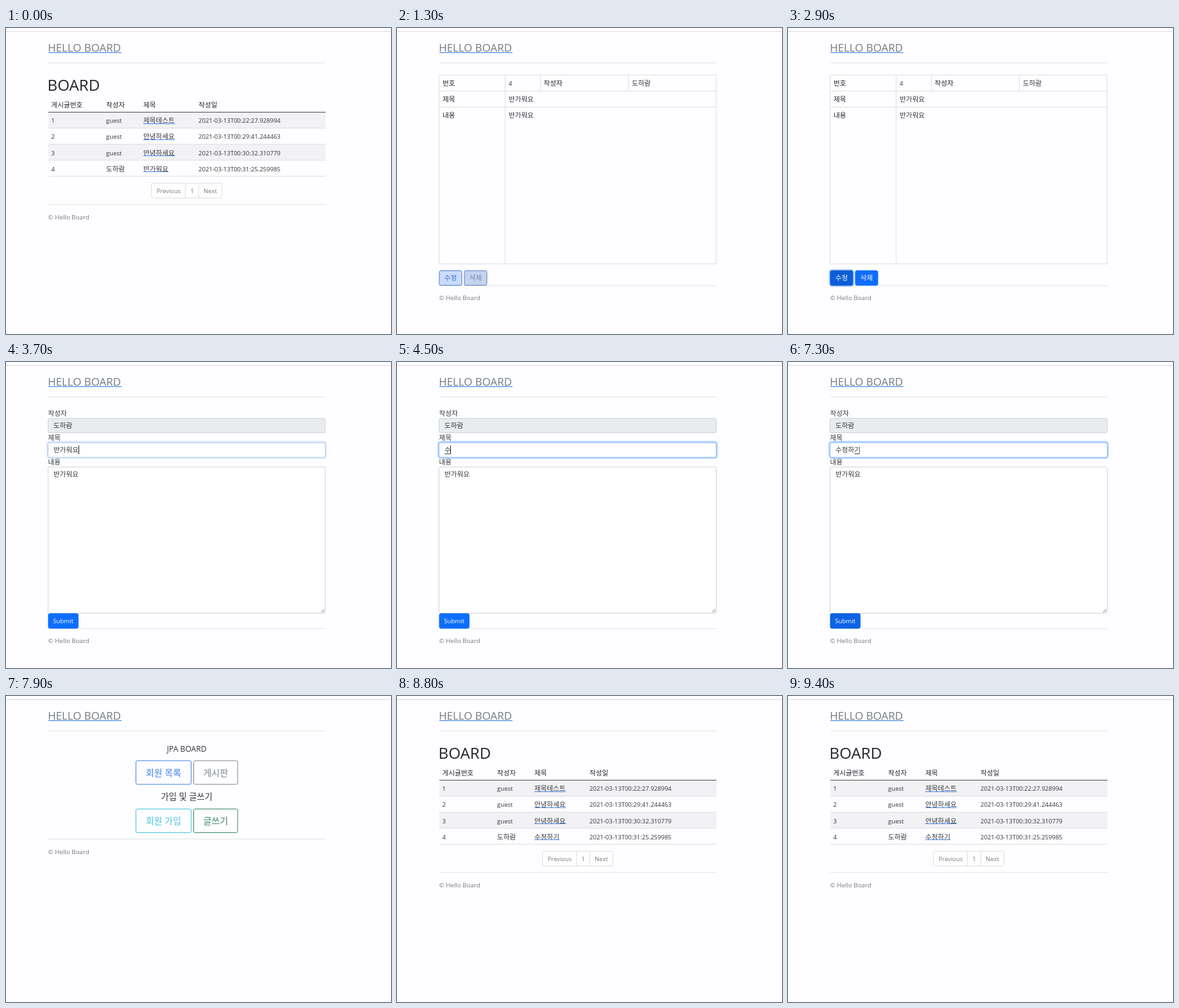
Recreate the animation shown at these times as an HTML page. Size 600x478 px, loop 9600 ms.

```html
<!DOCTYPE html>
<html lang="ko">
<head>
<meta charset="utf-8">
<title>Hello Board</title>
<style>
html, body { margin: 0; width: 100%; height: 100%; overflow: hidden; background: #fefdff; }
svg { display: block; width: 600px; height: 478px; font-family: "Open Sans", "Noto Sans CJK KR", sans-serif; }
</style>
</head>
<body>
<svg id="stage" viewBox="0 0 600 478"></svg>
<script>
const LOOP = 9600, TICK = 100;
const INK = '#32373c', GREY = '#747b82', RULE = '#e4e5e9', EDGE = '#dee0e5', BLUE = '#0d6efd';
const KO = 10.6, EN = 9.6, CHAR = 9.8;
const AUTHOR = '도하람', OLD_TITLE = '반가워요', NEW_TITLE = '수정하기';
const stage = document.getElementById('stage');

const clamp = v => Math.max(0, Math.min(1, v));
const ramp = (t, start, length) => clamp((t - start) / length);
const rgb = hex => [1, 3, 5].map(i => parseInt(hex.slice(i, i + 2), 16));
const mix = (a, b, p) => {
  const to = rgb(b);
  return `rgb(${rgb(a).map((v, i) => Math.round(v + (to[i] - v) * p))})`;
};

const text = (x, y, s, size = KO, fill = INK, extra = '') =>
  `<text x="${x}" y="${y}" font-size="${size}" fill="${fill}" ${extra}>${s}</text>`;
const bold = (x, y, s) => text(x, y, s, KO, '#212529', 'font-weight="500"');
const centered = (x, y, s, size, fill) => text(x, y, s, size, fill, 'text-anchor="middle"');
const path = (d, stroke = EDGE, width = 1) =>
  `<path d="${d}" fill="none" stroke="${stroke}" stroke-width="${width}"/>`;
const box = (x, y, w, h, fill, stroke, r = 2.5, extra = '') =>
  `<rect x="${x}" y="${y}" width="${w}" height="${h}" rx="${r}" fill="${fill}" stroke="${stroke}" ${extra}/>`;
const rule = y => path(`M66 ${y}H498`, RULE);
const ring = (x, y, w, h, opacity) =>
  box(x, y, w, h, 'none', '#86b7fe', 3.5, `stroke-width="3" stroke-opacity="${opacity}"`);
const footer = (ruleY, y) => rule(ruleY) + text(65.5, y, '© Hello Board', 9.8, GREY);

function header() {
  return path('M0 5.5H600', '#dcdde1') +
    text(65.2, 37, 'HELLO BOARD', 16.9, GREY) +
    path('M66 38.5H180', '#2f7bea', 1.2) + rule(54.5);
}

function listPage(lastTitle) {
  const rows = [
    ['guest', '제목테스트', '22:27.928994'],
    ['guest', '안녕하세요', '29:41.244463'],
    ['guest', '안녕하세요', '30:32.310779'],
    [AUTHOR, lastTitle, '31:25.259985']
  ];
  let out = text(64.5, 98, 'BOARD', 24.2, '#212529');
  [[70.5, '게시글번호'], [156, '작성자'], [214, '제목'], [300, '작성일']]
    .forEach(([x, s]) => out += bold(x, 123.5, s));
  rows.forEach(([author, title, time], i) => {
    const top = 132 + i * 25.1, y = top + 16.3;
    if (i % 2 === 0) out += `<rect x="66" y="${Math.floor(top)}" width="432" height="25" fill="#f2f1f3"/>`;
    out += path(`M66 ${Math.floor(top + 25) - .5}H498`) +
      text(70.5, y, i + 1, EN) +
      text(156, y, author, author === AUTHOR ? KO : EN) +
      text(214, y, title) +
      path(`M214 ${Math.floor(y) + 1.5}h${title.length * CHAR}`, '#3f82e6') +
      text(300, y, '2021-03-13T00:' + time, 9.53);
  });
  return out + path('M66 131.5H498', '#4a4e53') +
    box(226.5, 242.5, 110, 23, '#fff', EDGE) + path('M279.5 243V266M300.5 243V266') +
    centered(253.5, 258, 'Previous', 9.4, GREY) + centered(290, 258, '1', EN, GREY) +
    centered(318.5, 258, 'Next', EN, GREY) + footer(275.5, 299);
}

function detailPage(t) {
  const load = ramp(t, 1300, 200), hover = ramp(t, 2300, 200);
  const button = (x, s, fill, stroke, ink) =>
    box(x, 379, 35, 23, fill, stroke) + centered(x + 17.5, 394.3, s, KO, ink);
  const edit = load < 1 ? mix('#c9dcfc', BLUE, load) : mix(BLUE, '#0b5ed7', hover);
  return path('M66 73.5H497.5V368.5H65.5V73.5M66 98.5H498M66 123.5H498M168.5 73V369M223.5 73V98M360.5 73V98') +
    bold(71, 89.5, '번호') + text(174, 89.5, '4', EN) + bold(228.5, 89.5, '작성자') + text(366, 89.5, AUTHOR) +
    bold(71, 114.5, '제목') + text(174, 114.5, OLD_TITLE) +
    bold(71, 139.7, '내용') + text(174, 139.7, OLD_TITLE) +
    footer(402.5, 425.3) +
    (t >= 2700 ? ring(65, 378, 37, 25, .55) : '') +
    button(66, '수정', edit, load < 1 ? mix('#4a78c8', BLUE, load) : mix(BLUE, '#0a58ca', hover), mix('#3d6fd0', '#ffffff', load)) +
    button(105, '삭제', mix('#c5d3ee', BLUE, load), mix('#5d80c4', BLUE, load), mix('#7387b4', '#ffffff', load));
}

function titleAt(t) {
  if (t < 4400) return OLD_TITLE;
  const steps = [[5600, NEW_TITLE], [5500, '수정하'], [5400, '수정ㅎ'], [4900, '수정'], [4800, '수ㅈ'], [4500, '수']];
  const step = steps.find(([start]) => t >= start);
  return step ? step[1] : '';
}

function caretVisible(t) {
  if (t < 3600 || t >= 7600) return false;
  if (t < 4400) return t < 4000;
  return t < 5600 || Math.floor((t - 5600) / 540) % 2 === 0;
}

function editPage(t) {
  const focus = ramp(t, 3550, 300) * (1 - ramp(t, 7500, 200));
  const load = ramp(t, 2950, 150), hover = ramp(t, 7100, 300);
  const title = titleAt(t), end = 74 + title.length * CHAR;
  const fill = load < 1 ? mix('#c9dcfc', BLUE, load) : mix(BLUE, '#0b5ed7', hover);
  let out = text(65.5, 84, '작성자') + text(65.5, 122, '제목') + text(65.5, 160, '내용') +
    box(65.5, 88, 432, 22.5, '#e9ecef', '#ced4da') + text(74, 103, AUTHOR) +
    (focus ? ring(64.5, 124.8, 434, 25, focus * .55) : '') +
    box(65.5, 126, 432, 23, '#fff', mix('#ced4da', '#86b7fe', focus)) + text(74, 141, title) +
    box(65.5, 164, 432, 228.5, '#fff', '#ced4da') + text(74, 179, OLD_TITLE) +
    path('M491 391L496 386M494 391L496 389', '#777') + footer(416.5, 439.3);
  if (t >= 4500 && t < 7400) out += path(`M${end - CHAR} 143.5H${end - 1}`, '#444');
  if (caretVisible(t)) out += path(`M${Math.floor(end) + .5 - (title ? 0 : 1)} 130.5V144`, '#222');
  return out + (t >= 7500 ? ring(65, 392, 49, 25, .55) : '') +
    box(66, 393, 46.5, 23, fill, fill) + centered(89.2, 408, 'Submit', 9.6, mix('#3d6fd0', '#ffffff', load));
}

function homePage(t) {
  const load = ramp(t, 7800, 200), hover = ramp(t, 8250, 200);
  const button = (x, y, w, s, from, color, p = 0) => {
    const ink = mix(from, color, load);
    return box(x, y, w, 37, mix('#fefdff', color, p), ink) +
      centered(x + w / 2, y + 23.6, s, 14, p ? mix(color, '#ffffff', p) : ink);
  };
  return centered(281.7, 87, 'JPA BOARD', 12.1, INK) + centered(281.7, 162, '가입 및 글쓰기', 13.3, INK) +
    button(202.5, 101, 86, '회원 목록', '#6d96d8', BLUE) +
    button(292.5, 101, 68.5, '게시판', '#92969c', '#6c757d', hover) +
    button(202.5, 176.5, 86, '회원 가입', '#7fbdd0', '#0dcaf0') +
    button(292.5, 176.5, 68.5, '글쓰기', '#57897c', '#198754') +
    footer(223.5, 247);
}

function page(t) {
  if (t < 1300) return listPage(OLD_TITLE);
  if (t < 3000) return detailPage(t);
  if (t < 7800) return editPage(t);
  if (t < 8700) return homePage(t);
  return listPage(NEW_TITLE);
}

let shown = -1;
function draw() {
  const t = Math.floor(performance.now() % LOOP / TICK) * TICK;
  if (t !== shown) {
    shown = t;
    stage.innerHTML = header() + page(t);
  }
  requestAnimationFrame(draw);
}
draw();
</script>
</body>
</html>
```
